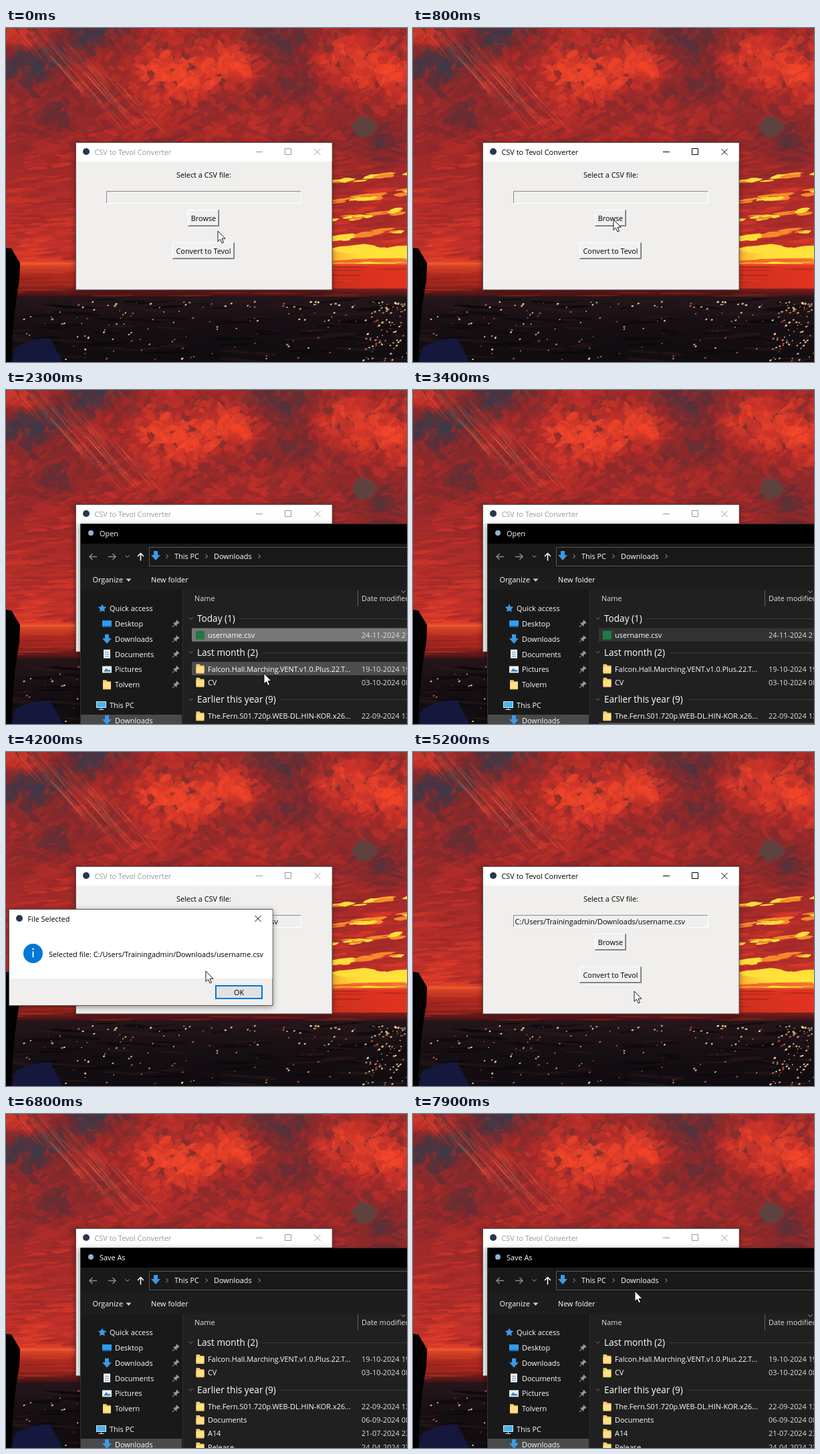
Write an HTML page with a canvas that moves like this. It is 600 px wide and 500 px high and loops after 8 s.

```html
<!DOCTYPE html>
<html lang="en">
<head>
<meta charset="utf-8">
<title>CSV converter</title>
<style>
html, body { margin: 0; width: 100%; height: 100%; overflow: hidden; background: #120c10; }
canvas, svg { position: absolute; left: 0; top: 0; width: 600px; height: 500px; }
text { font-family: "Open Sans", "Noto Sans", sans-serif; white-space: pre; }
.window { filter: drop-shadow(0 2px 4px #0006); }
.lit { stroke: #fff; } .dim { stroke: #a0a0a0; } .dark { stroke: #696969; }
.down .lit { stroke: #696969; } .down .dim { stroke: #f0f0f0; } .down .dark { stroke: #fff; }
</style>
</head>
<body>
<canvas id="sky" width="600" height="500"></canvas>
<svg id="ui" viewBox="0 0 600 500"></svg>
<script>
// ---------- wallpaper ----------
const ctx = document.getElementById('sky').getContext('2d');
const horizon = 354, shore = 402;
let seed = 77;
const rnd = (a = 0, b = 1) => a + (b - a) * (seed = seed * 16807 % 2147483647) / 2147483647;
const clamp = v => Math.max(0, Math.min(1, v));

function gradient(x, y, w, h, colors, sideways) {
  const g = sideways ? ctx.createLinearGradient(x, 0, x + w, 0) : ctx.createLinearGradient(0, y, 0, y + h);
  colors.forEach((c, i) => g.addColorStop(i / (colors.length - 1), c));
  ctx.fillStyle = g;
  ctx.fillRect(x, y, w, h);
}

// One brush mark: a rough oblong of seven jittered corners.
function dab(x, y, len, thick, angle, color, alpha = 1) {
  ctx.save();
  ctx.translate(x, y);
  ctx.rotate(angle);
  ctx.globalAlpha = alpha;
  ctx.fillStyle = color;
  ctx.beginPath();
  for (let i = 0; i < 7; i++) {
    const a = i / 7 * 2 * Math.PI;
    ctx.lineTo(len * (.55 * Math.cos(a) + rnd(-.08, .08)), thick * (.55 * Math.sin(a) + rnd(-.15, .15)));
  }
  ctx.fill();
  ctx.restore();
}

// Cloud colour runs from cold navy to hot orange; a few spots of [x, y, strength] bend it.
const ramp = ['#393a4b', '#6a2d32', '#98292a', '#c6322a', '#f4472b'].map(c => [1, 3, 5].map(i => parseInt(c.substr(i, 2), 16)));
const spots = [
  [20, 12, .3], [35, 52, -.6], [130, 0, -.5], [250, 65, .5], [350, 50, .35], [415, 20, -.55],
  [490, 35, .4], [580, 75, .4], [75, 130, -.25], [425, 90, -.25], [555, 165, -.35]
];

function heat(x, y) {
  const low = clamp(y / horizon);
  return spots.reduce((h, [sx, sy, s]) => h + s * Math.exp(-(((x - sx) / 58) ** 2) - ((y - sy) / 36) ** 2),
    .56 + .24 * low ** 3 + .05 * Math.sin(x / 31 + y / 17));
}

function cloudColor(h) {
  const p = clamp(h) * 3.999, i = p | 0;
  return `rgb(${ramp[i].map((c, k) => c + (ramp[i + 1][k] - c) * (p - i) | 0)})`;
}

function paintSky() {
  gradient(0, 0, 600, horizon, ['#83302f', '#98292a', '#c6322a']);
  for (let i = 0; i < 3200; i++) {
    const x = rnd(0, 600), y = rnd(-5, horizon), flat = clamp((y - 110) / 110), size = i < 1200 ? 1.5 : .8;
    dab(x, y, size * rnd(10, 24) * (1 + flat), size * rnd(5, 14) * (1 - .6 * flat),
      (rnd() < .6 ? -.7 : .8) * (1 - flat) * rnd(.5, 1.4) - .08 * flat, cloudColor(heat(x, y) + rnd(-.17, .17)), .7);
  }
  dab(535, 148, 34, 26, 0, '#574841', .8);
  for (let i = 0; i < 70; i++) {
    const s = rnd(0, 150);
    dab(30 + s + rnd(-15, 50), 15 + s * .8, rnd(30, 90), .8, .85, '#f4805c', .3);
  }

  // glowing cloud edges and the sun band at the right
  for (let row = 0; row < 4; row++)
    for (let i = 0; i < 13; i++) {
      const x = rnd(485, 605);
      dab(x, 224 + row * 28 - (x - 545) * .13 + rnd(-4, 4), rnd(14, 36), rnd(2, 6), -.12, rnd() < .5 ? '#ffdf3a' : '#f58a2a');
    }
  gradient(0, horizon - 6, 600, 10, ['#e8502c00', '#f0602c', '#d8402600']);
  gradient(380, 332, 220, 21, ['#f0602800', '#f98a2a', '#ffdf38', '#ffe53c'], true);
  for (let i = 0; i < 16; i++) dab(rnd(500, 600), rnd(326, 334), rnd(25, 60), 5, -.08, '#ffdf3a');
  for (let i = 0; i < 14; i++) dab(rnd(480, 600), rnd(346, 354), rnd(25, 60), 3, 0, '#f2662a', .8);

  // far shore, plain and town lights
  gradient(0, horizon, 600, shore - horizon, ['#de4a2a', '#a8281f', '#94231e', '#3d1216']);
  gradient(0, horizon + 2, 600, 34, ['#d8301f00', '#d8301f60', '#e2331f'], true);
  for (let i = 0; i < 90; i++) dab(rnd(0, 600), rnd(horizon + 3, shore), rnd(30, 90), 2, 0, rnd() < .5 ? '#6c1a1b' : '#d03a24', .35);
  gradient(0, shore, 600, 500 - shore, ['#24161a', '#150e12', '#100c0f']);
  for (let i = 0; i < 100; i++) dab(rnd(0, 600), rnd(405, 500), rnd(20, 80), rnd(2, 5), rnd(-.1, .1), rnd() < .5 ? '#2a181b' : '#08070b', .6);
  for (let i = 0; i < 240; i++) {
    const town = i % 3 === 0, y = shore + 8 + 88 * rnd() ** 1.4, s = rnd(1, 2.6);
    dab(town ? 572 - (y - shore) * .2 + rnd(-22, 28) : rnd(25, 600), y, s * 1.5, s, -.5, rnd() < .65 ? '#ffe0a4' : '#cf5a40', rnd(.6, 1));
  }
  ctx.fillStyle = '#020203';
  ctx.fill(new Path2D('M0 329L8 330 21 352 20 378Q10 430 8 500H0Z'));
  ctx.fillStyle = '#15173c';
  ctx.fill(new Path2D('M8 500L14 478Q36 465 66 464L85 500Z'));
}

// ---------- interface ----------
const text = (x, y, s, fill = '#fff', size = 10.9, anchor = 'start') =>
  `<text x="${x}" y="${y}" fill="${fill}" font-size="${size}" text-anchor="${anchor}">${s}</text>`;
const rect = (x, y, w, h, fill, extra = '') => `<rect x="${x}" y="${y}" width="${w}" height="${h}" fill="${fill}" ${extra}/>`;
const line = (d, stroke = '#fff', width = 1) => `<path d="${d}" fill="none" stroke="${stroke}" stroke-width="${width}"/>`;
const shape = (d, fill) => `<path d="${d}" fill="${fill}"/>`;
const edge = (d, cls) => `<path d="${d}" fill="none" class="${cls}"/>`;
const badge = (x, y, fill = '#26374f', r = 5) => `<circle cx="${x}" cy="${y}" r="${r}" fill="${fill}"/>`;
const cross = (x, y, color) => line(`M${x - 4.5} ${y - 4.5}l9 9m0-9l-9 9`, color);

const button = (id, x, y, w, h, label) => `<g id="${id}">` + rect(x, y, w, h, '#f0f0f0') +
  edge(`M${x + 1.5} ${y + h - 1.5}H${x + w - 1.5}V${y + 1}`, 'dim') +
  edge(`M${x + .5} ${y + h}V${y + .5}H${x + w}`, 'lit') +
  edge(`M${x} ${y + h - .5}H${x + w - .5}V${y}`, 'dark') +
  text(x + w / 2, y + 16.5, label, '#000', 10.9, 'middle') + '</g>';

const titled = (x, y, w, h, title, color) => rect(x, y, w, h, '#f0efee', 'stroke="#555"') + rect(x + .5, y + .5, w - 1, 28, '#fff') +
  badge(x + 15.5, y + 13.5) + text(x + 28, y + 18.2, title, color) + cross(x + w - 22, y + 14, color);

const path = 'C:/Users/Trainingadmin/Downloads/username.csv';

const mainWindow = '<g id="main" class="window">' +
  titled(104.5, 171.5, 383.5, 220.5, 'CSV to Tevol Converter', 'currentColor') +
  line('M374 185.5h10M417.5 180.5h9v9h-9z', 'currentColor') +
  text(296, 224, 'Select a CSV file:', '#000', 10.9, 'middle') +
  line('M150.5 262V244.5H441', '#8c8c8c') + line('M151 262.5H441.5V245', '#fff') +
  `<g id="entry">${text(152.5, 257.5, path, '#000')}</g>` +
  button('browse', 272, 272, 47, 25, 'Browse') + button('convert', 249, 321, 93, 25, 'Convert to Tevol') + '</g>';

const messageBox = '<g id="message" class="window">' +
  titled(4.5, 235.5, 394.5, 144, 'File Selected', '#000') + rect(5, 260, 393.5, 79, '#fff') +
  badge(40.5, 301.5, '#0078d7', 14.5) + line('M40.5 298.5v9', '#fff', 1.8) + badge(40.5, 295, '#fff', 1.2) +
  text(64, 306.5, 'Selected file: ' + path, '#000') +
  `<g id="ok">${rect(314, 350, 69, 19, '#e1e1e1', 'stroke="#0078d7" stroke-width="2"')}</g>` +
  text(348.5, 363.5, 'OK', '#000', 10.9, 'middle') + '</g>';

const downArrow = (x, y) => shape(`M${x - 3} ${y - 7}h6v6h4l-7 8-7-8h4z`, '#3a9be8');
const pointer = (x, y, turn, color) => `<g transform="translate(${x} ${y}) rotate(${turn})">${line('M6 0H-5m4.500-4.500l-4.500 4.500 4.500 4.500', color, 1.5)}</g>`;
const chevron = (x, y, turn = 0, color = '#aaa') => `<g transform="translate(${x} ${y}) rotate(${turn})">${line('M-1.500-3l3 3-3 3', color)}</g>`;
const pin = y => `<g transform="translate(254 ${y}) rotate(45)">${shape('M-3-5h6v1.500h-1V0l2 2h-8l2-2v-3.500h-1z', '#999')}${line('M0 2v5', '#999')}</g>`;
const folder = (x, y) => shape(`M${x - 6} ${y - 7}h5l1.5 2H${x + 6}v12h-12z`, '#f6cf66') + rect(x - 6, y - 3, 12, 8, '#ffe08a');
const star = (x, y, r) => shape('M' + Array.from({ length: 10 }, (_, i) =>
  [x + Math.sin(i * Math.PI / 5) * r / (1 + i % 2), y - Math.cos(i * Math.PI / 5) * r / (1 + i % 2)]).join('L') + 'z', '#3d9be9');
const places = {
  Desktop: (x, y) => rect(x - 7, y - 5, 14, 10, '#2f9df0') + rect(x - 7, y + 3, 14, 2, '#1768ad'),
  Downloads: downArrow,
  Documents: (x, y) => rect(x - 5, y - 7, 10, 13, '#f4f4f4') + line(`M${x - 3} ${y - 3}h6m-6 3h6m-6 3h6`, '#5b8fc4'),
  Pictures: (x, y) => rect(x - 7, y - 5, 14, 10, '#eaf2f6') + shape(`M${x - 5} ${y + 3}l4-5 3 3 2-1 2 3z`, '#3a7fb4'),
  Tolvern: folder
};

// A string is a heading; a pair is a file and its date.
const older = [
  'Last month (2)', ['Falcon.Hall.Marching.VENT.v1.0.Plus.22.T...', '19-10-2024 19:32'], ['CV', '03-10-2024 08:15'],
  'Earlier this year (9)', ['The.Fern.S01.720p.WEB-DL.HIN-KOR.x26...', '22-09-2024 13:20'],
  ['Documents', '06-09-2024 08:41'], ['A14', '21-07-2024 23:05'], ['Release', '24-04-2024 23:11']
];

function fileList(entries) {
  let y = 342, out = '';
  entries.forEach((entry, i) => {
    const head = typeof entry === 'string', [name, date] = head ? [entry] : entry;
    if (i) y += head ? 26 : typeof entries[i - 1] === 'string' ? 24.5 : 20.3;
    const top = head ? y - 12 : y - 10, h = head ? 25 : 20;
    out += rect(head ? 265 : 278, top, 335, h, '#4d4d4d', `class="row" data-top="${top}" data-h="${h}" data-name="${name}" opacity="0"`);
    if (head) out += chevron(276.5, y, 90, '#777') + text(286, y + 5, name, '#fff', 13.6) + `<path class="rule" d="M600 ${Math.round(y) + .5}" stroke="#3c3c3c"/>`;
    else out += (name.endsWith('.csv') ? rect(284, y - 6, 13, 13, '#1f7a45') : folder(290.5, y + .5)) +
      text(302, y + 4.5, name) + text(532, y + 4.5, date, '#e0e0e0');
  });
  return out;
}

function fileDialog(id, title, entries) {
  const side = Object.entries(places).map(([name, icon], i) => {
    const y = 350 + i * 22.8;
    return icon(151, y) + text(163, y + 4, name) + pin(y);
  }).join('');
  return `<g id="${id}" class="window">` + rect(112, 200, 500, 310, '#191919') +
    rect(112, 200, 500, 30, '#000') + line('M111.5 500V200.5H600', '#333') + badge(127, 214, '#8fb4d6', 4) + text(140, 219, title) +
    pointer(130, 249.5, 0, '#8a8a8a') + pointer(159, 249.5, 180, '#8a8a8a') + chevron(181.5, 249, 90) + pointer(201.5, 249.5, 90, '#fff') +
    rect(214.5, 235.5, 400, 28, '#191919', 'stroke="#565656"') + downArrow(224, 248) +
    chevron(241, 249) + text(252, 253, 'This PC') + chevron(300, 249) + text(311, 253, 'Downloads') +
    `<g class="crumb">${chevron(379, 249)}</g>` +
    rect(112, 267, 500, 32, '#1d1d1d') + text(129.5, 288, 'Organize') + shape('M179.5 282.5h8l-4 4.5z', '#ccc') + text(217, 288, 'New folder') +
    rect(265, 299, 350, 210, '#202020') + line('M264.5 300V500', '#2e2e2e') +
    text(282, 316, 'Name', '#dedede') + line('M526.5 300V324', '#636363') + text(532, 316, 'Date modified', '#dedede') + chevron(594.5, 302, 90) +
    star(144, 327, 6.5) + text(155, 331, 'Quick access') + side +
    rect(135.5, 466.5, 14, 9, '#48b4f0', 'stroke="#d8e6ee"') + line('M142.5 476v2m-4 .5h8', '#d8e6ee') + text(155, 476, 'This PC') +
    rect(112, 486, 151, 14, '#4a4a4a') + downArrow(151, 494) + text(163, 499, 'Downloads') + fileList(entries) + '</g>';
}

const ui = document.getElementById('ui');
ui.innerHTML = mainWindow + messageBox +
  fileDialog('open', 'Open', ['Today (1)', ['username.csv', '24-11-2024 21:14'], ...older]) +
  fileDialog('save', 'Save As', older) +
  '<path id="cursor" d="M0 0V15.5L3.5 12.2 6 18 8.5 17 6.1 11.3H11Z" fill="#fff" stroke="#000" stroke-width=".9"/>';
const el = id => document.getElementById(id);
for (const rule of ui.querySelectorAll('.rule'))
  rule.setAttribute('d', rule.getAttribute('d') + `H${293 + rule.previousElementSibling.getComputedTextLength()}`);

// ---------- timeline ----------
// Cursor moves: start time, end time, and where it comes to rest.
const moves = [
  [0, 400, 300, 287], [1000, 1300, 260, 298], [1300, 1700, 330, 367], [2100, 2600, 470, 510],
  [3700, 4200, 299, 328], [4200, 4600, 345, 360], [5100, 5200, 331, 358], [5200, 5500, 303, 333],
  [6300, 6800, 360, 510], [7700, 7900, 332, 265]
];
const cursorAt = t => moves.reduce(([x, y], [from, to, toX, toY]) => {
  const p = clamp((t - from) / (to - from));
  return [x + (toX - x) * p, y + (toY - y) * p];
}, [317, 304]);

function render(time) {
  const t = Math.floor(time % 8000 / 100) * 100;
  const during = (a, b) => t >= a && t < b;
  const show = (node, on) => node.style.display = on ? '' : 'none';
  const [x, y] = cursorAt(t);

  const active = during(700, 1100) || during(3500, 3800) || during(5000, 5900);
  el('main').style.color = active ? '#000' : '#999';
  show(el('entry'), t >= 3800);
  show(el('message'), during(3800, 5000));
  show(el('open'), during(1100, 3500));
  show(el('save'), t >= 5900);
  show(el('open').querySelector('.crumb'), t >= 1400);
  show(el('save').querySelector('.crumb'), t >= 6400);
  el('browse').classList.toggle('down', during(700, 800));
  el('convert').classList.toggle('down', during(5700, 5800));
  el('ok').firstChild.setAttribute('fill', during(4900, 5000) ? '#cce4f7' : '#e1e1e1');

  for (const row of ui.querySelectorAll('.row')) {
    const { top, h, name } = row.dataset;
    const hover = x > 265 && y >= +top && y < +top + +h;
    const chosen = name === 'username.csv' && t >= 2200;
    row.setAttribute('opacity', hover || chosen ? 1 : 0);
    row.setAttribute('fill', chosen ? t >= 3400 ? '#333' : '#777' : '#4d4d4d');
  }
  el('cursor').setAttribute('transform', `translate(${x} ${y})`);
}

paintSky();
const start = performance.now();
(function tick() {
  render(performance.now() - start);
  requestAnimationFrame(tick);
})();
</script>
</body>
</html>
```
